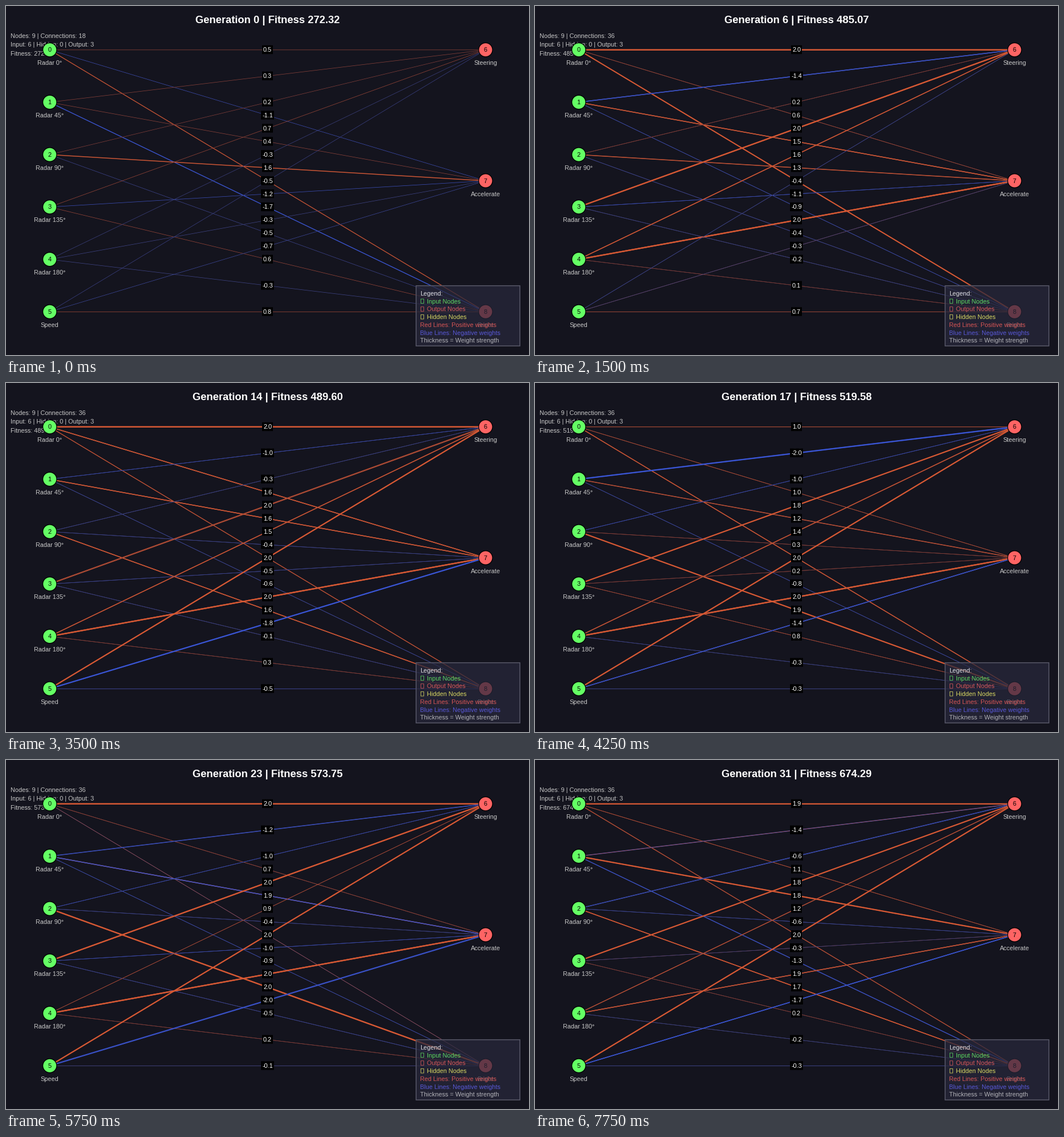
Animation of 917x611 px, one loop 8 s. Source, as a matplotlib script:

```python
import math
import random

import matplotlib.pyplot as plt
import numpy as np
from matplotlib.animation import FuncAnimation
from matplotlib.patches import Circle, Rectangle

W, H, DPI = 917, 611, 64
SCALE = W / 1200
PT = 72 / DPI
FRAMES, STEP = 32, 250
LAST = FRAMES - 1
SMALL, BIG = 10.9, 18.33


def rgb(*c):
    return tuple(v / 255 for v in c)


BG = rgb(20, 20, 30)
GREY = rgb(200, 200, 200)
GREEN, RED = rgb(100, 255, 100), rgb(255, 100, 100)

INPUTS = [f"Radar {45 * i}°" for i in range(5)] + ["Speed"]
OUTPUTS = ["Steering", "Accelerate", "Brake"]
POS = [(100 * SCALE, (100 + 120 * i) * SCALE) for i in range(6)]
POS += [(1100 * SCALE, (100 + 300 * i) * SCALE) for i in range(3)]
EDGES = [(a, b) for a in range(6) for b in range(6, 9)]

# First and last genome, ordered like EDGES
FIRST = [.5, -1.1, 1.5, .3, .4, -1.7, .2, 1.6, -.5,
         .7, -1.2, .6, -.3, -.3, -.3, -.5, -.7, .8]
FINAL = [1.9, 1.1, 1.4, -1.4, 1.8, -1.3, -.6, -.6, 1.7,
         1.8, -.3, .2, 1.2, 1.9, -.2, 2.0, -1.7, -.3]
FITNESS = {0: 272.32, 6: 485.07, 10: 489.58, 14: 489.60,
           19: 539.56, 23: 573.75, LAST: 674.29}

adopt_rng = random.Random(4)
ADOPTED = [adopt_rng.uniform(1, 12) for _ in EDGES]


def clip(w):
    return max(-2, min(2, w))


def genome(gen):
    """Weights per edge: one at first, later a second connection as well."""
    rng = random.Random(gen)
    spread = 0.5 * math.sin(math.pi * gen / LAST)
    pairs = []
    for start, end, adopted in zip(FIRST, FINAL, ADOPTED):
        base = start if gen < adopted else end
        w = round(clip(base + rng.gauss(0, spread)), 1) or 0.1
        twin = rng.uniform(-2, 2) if rng.random() < 0.25 else clip(1.12 * w)
        pairs.append([w, twin] if gen else [w])
    return pairs


def weight_color(w):
    if w > 0:
        lo, hi = (115, 58, 58), (212, 88, 52)
    else:
        lo, hi = (62, 62, 112), (58, 85, 212)
    t = min(1, abs(w) / 1.8)
    return rgb(*(a + (b - a) * t for a, b in zip(lo, hi)))


fig = plt.figure(figsize=(W / DPI, H / DPI), dpi=DPI, facecolor=BG)
ax = fig.add_axes([0, 0, 1, 1])
ax.set_xlim(0, W)
ax.set_ylim(H, 0)
ax.axis("off")


def text(x, y, s, color=GREY, size=SMALL, z=1, **kw):
    """Text whose capitals are centred on y."""
    return ax.text(x, y + 0.36 * size, s, color=color, fontsize=size * PT,
                   family="Liberation Sans", va="baseline", zorder=z, **kw)


def rect(x, y, w, h, z, **kw):
    return ax.add_patch(Rectangle((x, y), w, h, zorder=z, snap=False, **kw))


title = text(W / 2, 23.5, "", "white", BIG, ha="center", weight="bold")
stats = [text(7.6, 52 + 15.3 * i, "") for i in range(3)]

# A wider and a narrower line on every edge, with the weight in the middle
links = []
for i, (a, b) in enumerate(EDGES):
    (x0, y0), (x1, y1) = POS[a], POS[b]
    pair = [ax.plot([x0, x1], [y0 + .4, y1 + .4], snap=False, zorder=2,
                    solid_capstyle="butt")[0] for _ in range(2)]
    slant = (x1 - x0) / math.hypot(x1 - x0, y1 - y0)
    y, z = (y0 + y1) / 2, 3 + i / 20
    box = rect(W / 2, y - 7.6, 0, 15.3, z, fc="black", lw=0)
    label = text(W / 2, y, "", "white", z=z + .02, ha="center")
    links.append((pair, slant, box, label))

for i, ((x, y), name) in enumerate(zip(POS, INPUTS + OUTPUTS)):
    center = x + .3, y + .3
    ax.add_patch(Circle(center, 12.8, fc="black", lw=0, zorder=5))
    ax.add_patch(Circle(center, 11.5, fc=GREEN if i < 6 else RED, lw=0, zorder=6))
    text(x, y, str(i), "black", z=7, ha="center")
    text(x, y + 23, name, z=7, ha="center")

# Legend over the last node
rect(718.4, 488.9, 183.4, 106.9, 8, fc=rgb(40, 40, 60), alpha=.72, lw=0)
rect(719.1, 489.7, 181.9, 105.4, 9, fill=False, ec=rgb(88, 88, 104), lw=1.5 * PT)
LEGEND = [
    ("Legend:", (225, 225, 230), False),
    ("Input Nodes", (92, 215, 97), True),
    ("Output Nodes", (215, 88, 92), True),
    ("Hidden Nodes", (215, 215, 97), True),
    ("Red Lines: Positive weights", (215, 85, 85), False),
    ("Blue Lines: Negative weights", (88, 88, 215), False),
    ("Thickness = Weight strength", (178, 178, 184), False),
]
for i, (s, c, marker) in enumerate(LEGEND):
    y = 503 + 13.75 * i
    if marker:
        rect(727.3, y - 3.8, 5.2, 7.6, 10, fill=False, ec=rgb(*c), lw=.8 * PT)
    text(737.5 if marker else 726, y, s, rgb(*c), z=10)


def update(gen):
    fitness = np.interp(gen, list(FITNESS), list(FITNESS.values()))
    title.set_text(f"Generation {gen} | Fitness {fitness:.2f}")
    stats[0].set_text(f"Nodes: 9 | Connections: {36 if gen else 18}")
    stats[1].set_text("Input: 6 | Hidden: 0 | Output: 3")
    stats[2].set_text(f"Fitness: {fitness:.2f}")
    for (pair, slant, box, label), weights in zip(links, genome(gen)):
        pair[1].set_visible(len(weights) > 1)
        for line, w in zip(pair, sorted(weights, key=abs, reverse=True)):
            line.set_color(weight_color(w))
            line.set_linewidth(max(1, int(abs(w) * 1.5)) * SCALE * slant * PT)
        width = 19 if weights[0] > 0 else 22.8
        box.set_x((W - width) / 2)
        box.set_width(width)
        label.set_text(f"{weights[0]:.1f}")
    return []


anim = FuncAnimation(fig, update, frames=FRAMES, interval=STEP,
                     init_func=lambda: update(0), repeat=True, repeat_delay=0)
plt.show()
```
